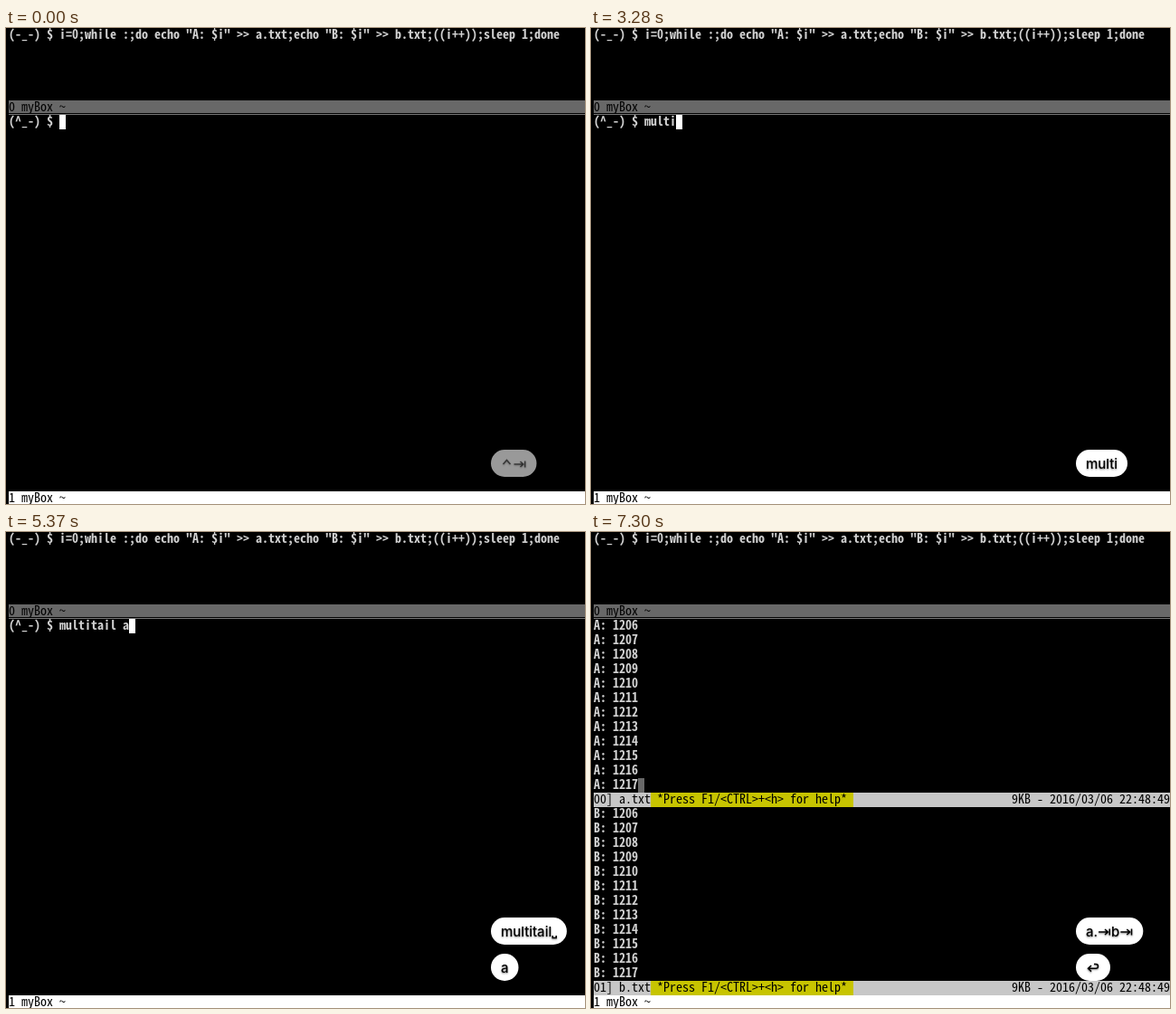
An HTML page with a canvas for the animation above (8000 ms loop, 640x526 px).

```html
<!DOCTYPE html>
<html lang="en">
<head>
<meta charset="utf-8">
<title>Following two logs</title>
<style>
  html, body { margin: 0; width: 100%; height: 100%; overflow: hidden; background: #000; }
  canvas { display: block; }
</style>
</head>
<body>
<canvas id="stage" width="640" height="526"></canvas>
<script>
const ctx = document.getElementById('stage').getContext('2d');
const LOOP = 8000, LEFT = 3, CELL = 7, ROW = 16;
const MONO = "14px 'Noto Sans Mono CJK JP', 'Noto Sans Mono', monospace";
const KEYS = "500 15px Inter, 'Liberation Sans', sans-serif";
const COMMAND = 'multitail a.txt b.txt ';
const LOOP_COMMAND = '(-_-) $ i=0;while :;do echo "A: $i" >> a.txt;echo "B: $i" >> b.txt;((i++));sleep 1;done';

// start time, typed characters, newest key bubble, older bubble, older bubble's opacity
const STEPS = [
  [0, 0, '', '⌃⇥', 0.6],
  [150, 0, ''],
  [2700, 0, 'm'],
  [2840, 1, 'm'],
  [2990, 2, 'mu'],
  [3130, 3, 'mult'],
  [3280, 5, 'multi'],
  [3580, 5, 'multit'],
  [3730, 7, 'multita'],
  [3880, 8, 'multitai'],
  [4020, 9, 'multitail'],
  [4170, 10, 'multitail␣'],
  [5370, 11, 'a', 'multitail␣', 1],
  [5520, 12, 'a.⇥', 'multitail␣', 1],
  [5660, 16, 'a.⇥', 'multitail␣', 1],
  [5960, 16, 'a.⇥b', 'multitail␣', 1],
  [6110, 17, 'a.⇥b⇥', 'multitail␣', 1],
  [6260, 22, 'a.⇥b⇥', 'multitail␣', 0.6],
  [6400, 22, 'a.⇥b⇥'],
  [7300, 22, '↩', 'a.⇥b⇥', 1]
];

// Key symbols: advance width and strokes relative to the baseline
const SYMBOLS = {
  '⌃': [13.5, 'M2.5 -5 L6.5 -9.5 L10.5 -5'],
  '⇥': [15, 'M1 -5 H11 M8 -8 L11.3 -5 L8 -2 M13.2 -8.5 V-1.5'],
  '␣': [5.7, 'M1 -1 V1.5 H5 V-1'],
  '↩': [16, 'M6 -8 L2.5 -4.7 L6 -1.4 M3 -4.7 H11 Q13.5 -4.7 13.5 -7 Q13.5 -9.5 11 -9.5 H9']
};

const columnX = column => LEFT + column * CELL;

function fill(color, x, y, w, h) {
  ctx.fillStyle = color;
  ctx.fillRect(x, y, w, h);
}

function print(text, column, row, color = '#d0d0d0', weight = 'bold') {
  ctx.font = `${weight} ${MONO}`;
  ctx.fillStyle = color;
  [...text].forEach((char, i) => ctx.fillText(char, columnX(column + i), row * ROW + 12));
}

function statusBar(text, row, color) {
  fill(color, LEFT, row * ROW, 640, 14);
  print(text, 0, row, '#000', 'normal');
}

function logPane(letter, firstRow, title) {
  for (let i = 0; i < 12; i++) print(`${letter}: ${1206 + i}`, 0, firstRow + i);
  const row = firstRow + 12;
  fill('#c7c7c7', LEFT, row * ROW, 640, ROW);
  fill('#c7c400', columnX(9), row * ROW, 32 * CELL, ROW);
  print(title, 0, row, '#000', 'normal');
  print('*Press F1/<CTRL>+<h> for help*', 10, row, '#000', 'normal');
  print('9KB - 2016/03/06 22:48:49', 66, row, '#000', 'normal');
}

function advance(char) {
  return SYMBOLS[char] ? SYMBOLS[char][0] : ctx.measureText(char).width;
}

function bubble(label, top, opacity = 1) {
  if (!label) return;
  ctx.save();
  ctx.globalAlpha = opacity;
  ctx.font = KEYS;
  const width = [...label].reduce((sum, char) => sum + advance(char), 22);
  ctx.fillStyle = '#fff';
  ctx.beginPath();
  ctx.roundRect(536, top, width, 30, 15);
  ctx.fill();

  ctx.fillStyle = ctx.strokeStyle = '#000';
  ctx.lineWidth = 1.5;
  ctx.shadowColor = 'rgba(0, 0, 0, 0.5)';
  ctx.shadowBlur = 2;
  ctx.shadowOffsetY = 1;
  ctx.translate(547, top + 21);
  for (const char of label) {
    if (SYMBOLS[char]) ctx.stroke(new Path2D(SYMBOLS[char][1]));
    else ctx.fillText(char, 0, 0);
    ctx.translate(advance(char), 0);
  }
  ctx.restore();
}

function draw(time) {
  const [start, typed, label, older, opacity] = STEPS.findLast(step => step[0] <= time);
  fill('#000', 0, 0, 640, 526);
  print(LOOP_COMMAND, 0, 0);
  statusBar('0 myBox ~', 5, '#686868');
  fill('#777', LEFT, 95, 640, 1);
  statusBar('1 myBox ~', 32, '#fff');

  if (start < 7300) {
    print('(^_-) $ ' + COMMAND.slice(0, typed), 0, 6);
    fill('#fff', columnX(8 + typed), 6 * ROW, CELL, ROW);
  } else {
    logPane('A', 6, '00] a.txt');
    logPane('B', 19, '01] b.txt');
    fill('#686868', columnX(7), 17 * ROW, CELL, ROW);
  }
  bubble(older, label ? 426 : 466, opacity);
  bubble(label, 466);
}

const origin = performance.now();
function tick() {
  draw((performance.now() - origin) % LOOP);
  requestAnimationFrame(tick);
}
tick();
</script>
</body>
</html>
```
